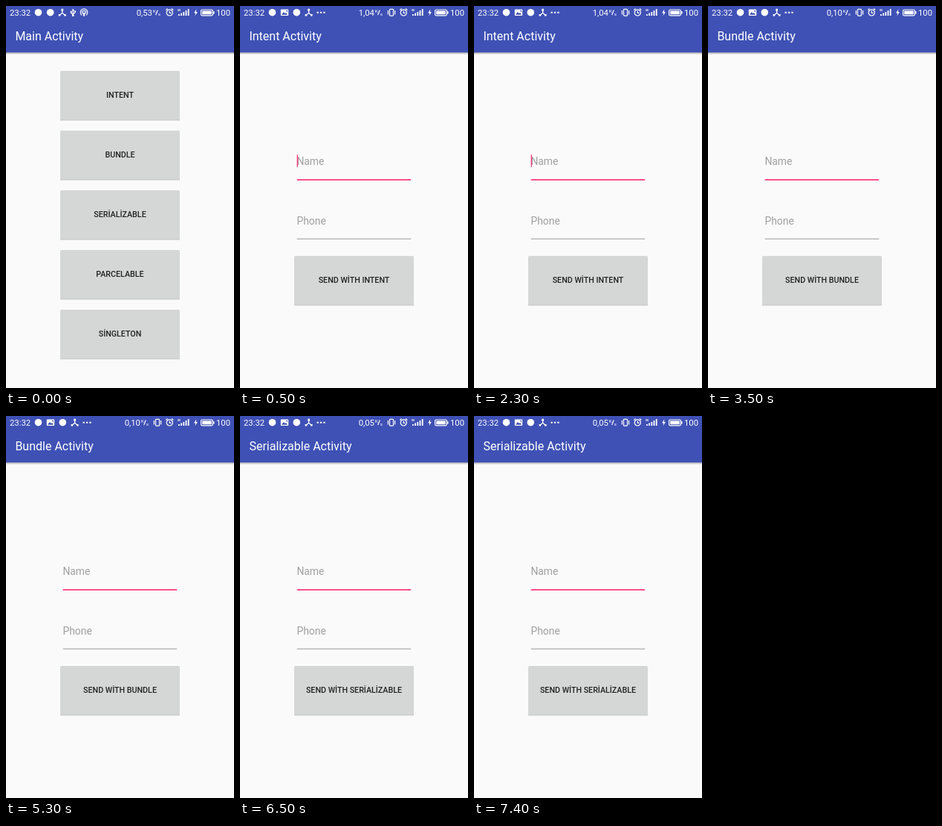
Write an HTML page that moves like this. It is 307 by 512 pixels and loops after 8 s.

```html
<!DOCTYPE html>
<html lang="en">
<head>
<meta charset="utf-8">
<style>
html, body { margin: 0; width: 100%; height: 100%; overflow: hidden; background: #fafafa; }
svg { display: block; width: 100%; height: 100%; font-family: Roboto, sans-serif; }
.title { font-size: 16px; fill: #fff; }
.status { font-size: 11.3px; fill: #fff; }
.unit { font-size: 6.2px; fill: #fff; }
.button { font-size: 10.7px; font-weight: 500; fill: #202020; text-anchor: middle; }
.hint { font-size: 13.9px; fill: #a0a0a0; }
.line { fill: none; stroke: #fff; stroke-width: 1.2; }
.solid { fill: #fff; }
</style>
</head>
<body>
<svg id="stage" viewBox="0 0 307 512">
  <defs>
    <linearGradient id="shade" x2="0" y2="1">
      <stop stop-color="#000" stop-opacity=".3"/>
      <stop offset="1" stop-color="#000" stop-opacity="0"/>
    </linearGradient>
    <circle id="app" class="solid" r="4.8"/>
    <g id="merge">
      <path class="line" d="M0-3V.5L-3.5 3.5M0 .5L3.5 3.5"/>
      <path class="solid" d="M-1.4-5h2.8v3h-2.8zM-5 2.3h2.6v2.5H-5zM2.4 2.3H5v2.5H2.4z"/>
    </g>
    <g id="usb">
      <path class="line" stroke-width="1" d="M0-3V4M-2.6-1V1L0 2.6M2.6-1.5V.3L0 2"/>
      <path class="solid" d="M0-5.2L1.8-2.4H-1.8zM-3.6-2h2v2h-2zM1.6-2.4h2v2h-2z"/>
      <circle class="solid" cy="4" r="1.4"/>
    </g>
    <g id="hotspot">
      <path class="line" d="M-2.8 3.9A4.8 4.8 0 1 1 2.8 3.9M-1.7 1.9A2.5 2.5 0 1 1 1.7 1.9"/>
      <path class="solid" d="M-1.2 0h2.4l-.4 5h-1.6z"/>
    </g>
    <g id="picture">
      <rect class="solid" x="-5.2" y="-4.2" width="10.4" height="8.6" rx="1"/>
      <path fill="#3f51b5" d="M-4 3L-1.2-.8L.7 1.4L2 .2L4 3zM1.4-2.8H4V-.6z"/>
    </g>
    <path id="dots" class="solid" d="M-5.5-1h2.3v2h-2.3zM-1.1-1h2.3v2h-2.3zM3.3-1h2.3v2H3.3z"/>
    <g id="vibrate" class="line">
      <rect x="-2.5" y="-4.4" width="5" height="8.8" rx=".8"/>
      <path d="M-4.6-2.8V2.8M4.6-2.8V2.8"/>
    </g>
    <g id="alarm" class="line">
      <circle cy=".4" r="4.1"/>
      <path d="M0-2V.8H2.2M-5-3L-2.7-5M5-3L2.7-5"/>
    </g>
  </defs>
  <rect width="307" height="512" fill="#fafafa"/>
  <rect y="62" width="307" height="3.5" fill="url(#shade)"/>
  <rect width="307" height="62.3" fill="#3f51b5"/>
  <text class="status" x="5" y="13">23:32</text>
  <use href="#alarm" x="220.3" y="8.5"/>
  <path class="solid" d="M231.5 4h1v3h-1zM233.5 4h1v3h-1zM232 11h1.8v2H232zM235.2 9.5h1.8V13h-1.8zM238.4 8h1.8v5h-1.8zM241.6 6h1.8v7h-1.8zM244.8 4h1.8v9h-1.8z"/>
  <path class="solid" d="M256.4 4.2L253.2 9.4H255.3L254.5 13.2L257.9 7.9H255.8z"/>
  <rect class="line" x="262.6" y="5" width="15.8" height="7.8" rx="1.5"/>
  <path class="solid" d="M264.2 6.6h12.6v4.6h-12.6zM279 7.2h1.6v3.4H279z"/>
  <text class="status" x="283" y="13">100</text>
  <g id="screen"></g>
</svg>
<script>
const screenEl = document.getElementById('screen');

const text = (kind, x, y, s) => `<text class="${kind}" x="${x}" y="${y}">${s}</text>`;
const rect = (x, y, w, h, fill) => `<rect x="${x}" y="${y}" width="${w}" height="${h}" fill="${fill}"/>`;
const icon = (name, x) => `<use href="#${name}" x="${x}" y="8.7"/>`;

const speed = (x, value) => text('status', x, 13, value) +
  text('unit', x + 22, 9, 'K') + text('unit', x + 29, 12.5, 's') +
  `<path class="line" stroke-width=".7" d="M${x + 26} 12L${x + 28.5} 5.5"/>`;

const button = (y, label) =>
  rect(73, y + 64.5, 161, 3, 'url(#shade)') +
  `<rect x="73" y="${y}" width="161" height="65.3" rx="1.5" fill="#d5d7d6"/>` +
  text('button', 153.5, y + 36.3, label);

const menu = () =>
  icon('app', 43.5) + icon('app', 59.7) + icon('merge', 75.8) + icon('usb', 90.3) + icon('hotspot', 105) +
  speed(175.7, '0,53') + text('title', 12.4, 46, 'Main Activity') +
  ['INTENT', 'BUNDLE', 'SERİALİZABLE', 'PARCELABLE', 'SİNGLETON']
    .map((label, i) => button(87 + 80 * i, label)).join('');

const form = (name, rate, cursor) =>
  icon('app', 43.5) + icon('picture', 60) + icon('app', 76.3) + icon('merge', 92.6) + icon('dots', 109) +
  speed(159.7, rate) + icon('vibrate', 204) +
  text('title', 12.4, 46, name + ' Activity') +
  text('hint', 76.4, 212.5, 'Name') + rect(76.7, 232, 153.5, 1.8, '#ff4081') +
  text('hint', 76.4, 292.5, 'Phone') + rect(76.7, 311.7, 153.5, 0.8, '#808080') +
  (cursor ? rect(76.6, 199.3, 1.4, 16.5, '#ff4081') : '') +
  button(335, 'SEND WİTH ' + name.toUpperCase().replace(/I(?!NTENT)/g, 'İ'));

const scenes = [
  [0, menu()],
  [500, form('Intent', '1,04', true)],
  [3500, form('Bundle', '0,10')],
  [6500, form('Serializable', '0,05')]
];

let shown;
function draw() {
  const t = performance.now() % 8000;
  const scene = scenes.findLast(([start]) => t >= start);
  if (scene !== shown) {
    shown = scene;
    screenEl.innerHTML = scene[1];
  }
  requestAnimationFrame(draw);
}
draw();
</script>
</body>
</html>
```
